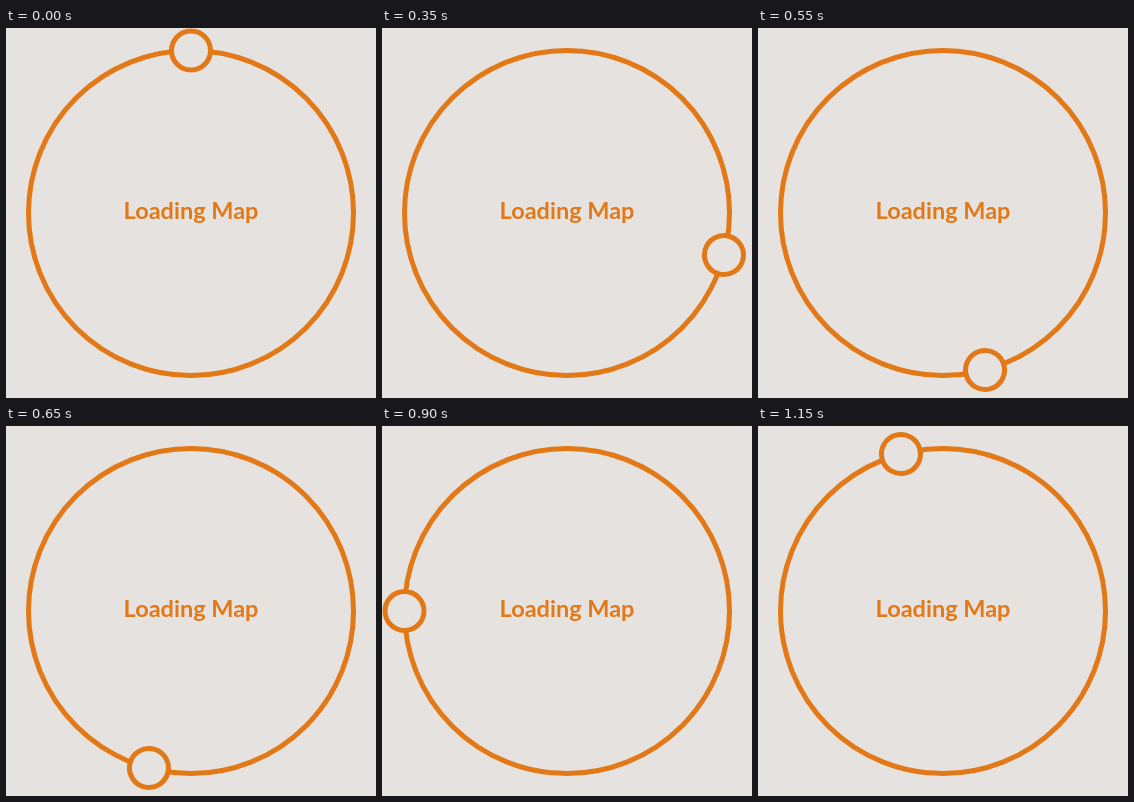
Write an HTML page that moves like this. It is 370 px wide and 370 px high and loops after 1.2 s.

```html
<!DOCTYPE html>
<html>
<head>
<meta charset="utf-8">
<title>Loading Map</title>
<style>
  html, body { margin: 0; height: 100%; overflow: hidden; background: #e5e2df; }
  svg { display: block; width: 100vw; height: 100vh; }
  circle { fill: #e5e2df; stroke: #e27816; stroke-width: 5; }
  text { font: bold 23.5px Lato, Cabin, sans-serif; fill: #e27816; text-anchor: middle; }
</style>
</head>
<body>
<svg viewBox="0 0 370 370">
  <circle cx="185" cy="185" r="162.5"/>
  <circle id="knob" cx="185" cy="22.5" r="19.5"/>
  <text x="185" y="191">Loading Map</text>
</svg>
<script>
  const knob = document.getElementById('knob');
  const STEP_MS = 50, STEPS = 24;

  function draw() {
    const step = Math.floor(performance.now() / STEP_MS) % STEPS;
    knob.setAttribute('transform', `rotate(${step * 360 / STEPS} 185 185)`);
    requestAnimationFrame(draw);
  }
  draw();
</script>
</body>
</html>
```
